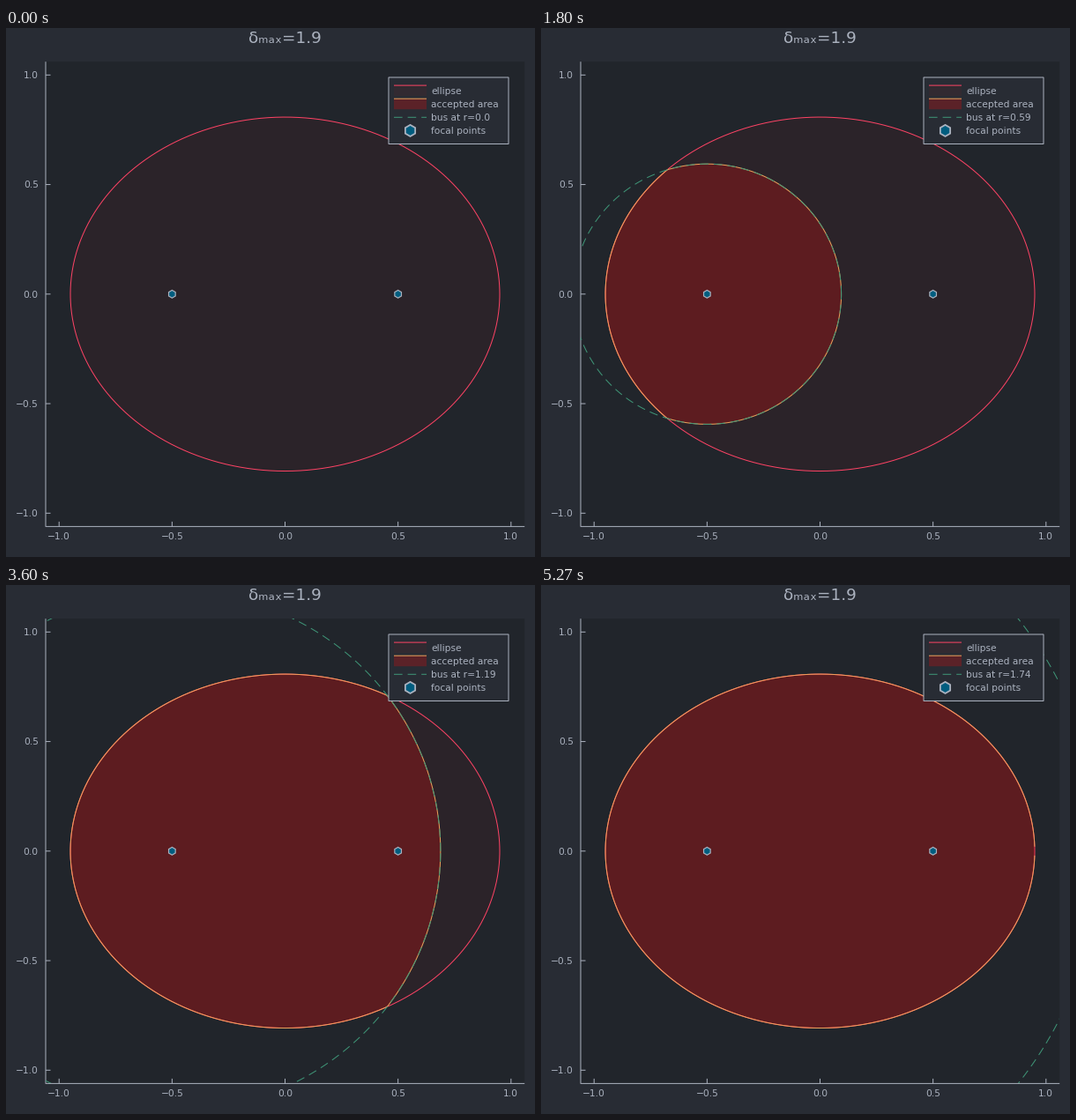
Recreate the animation shown at these times as a matplotlib script. Size 600 px wide and 600 px high, loop 5340 ms.

```python
import numpy as np
import matplotlib.pyplot as plt
from matplotlib.animation import FuncAnimation
from matplotlib.patches import Polygon, Rectangle, RegularPolygon

SIZE, DPI = 600, 100
LOOP_MS, TICK_MS = 5340, 20
STEPS, DR = 80, 0.022

BACK, INSIDE, FORE = "#282C34", "#21252B", "#ABB2BF"
PINK, ORANGE, GREEN, BLUE = "#FE4365", "#ECA25C", "#3F9778", "#005D7F"
TINT = "#F40808"

LEFT, RIGHT, TOP, BOTTOM = 45, 588.2, 38.2, 565.4
CX, CY, SX, SY = 316.5, 301.8, 256.3, 248.5

DELTA = 1.9
A, C = DELTA / 2, 0.5
B = np.sqrt(A**2 - C**2)

plt.rcParams["font.family"] = "DejaVu Sans"
plt.rcParams["path.snap"] = False
plt.rcParams["lines.solid_capstyle"] = "butt"


def pt(px):
    return px * 72 / DPI


def to_px(x, y):
    return np.column_stack([CX + SX * x, CY - SY * y])


fig = plt.figure(figsize=(SIZE / DPI, SIZE / DPI), dpi=DPI, facecolor=BACK)
ax = fig.add_axes([0, 0, 1, 1])
ax.set_xlim(0, SIZE)
ax.set_ylim(SIZE, 0)
ax.axis("off")

LW = pt(1.0)
DASH = (0, (9.6, 6))  # in line widths, so in pixels here


def rect(x0, y0, x1, y1, z, **style):
    return ax.add_patch(Rectangle((x0, y0), x1 - x0, y1 - y0, zorder=z, **style))


def line(xs, ys, color, z, **style):
    return ax.plot(xs, ys, color=color, lw=LW, zorder=z, **style)[0]


def label(x, y, s, size=10.67, ha="left", z=9):
    return ax.text(x, y, s, fontsize=pt(size), color=FORE, ha=ha,
                   va="baseline", zorder=z)


def hexagon(x, y, radius, edge, z):
    ax.add_patch(RegularPolygon((x, y), 6, radius=radius, fc=BLUE, ec=FORE,
                                lw=pt(edge), zorder=z))


def area(points, alpha, z):
    return ax.add_patch(Polygon(points, fc=TINT, alpha=alpha, lw=0, zorder=z))


# Plot area, axes and ticks
panel = rect(LEFT, TOP, RIGHT, BOTTOM, 0, fc=INSIDE, lw=0)
line([LEFT, LEFT, RIGHT], [TOP, BOTTOM, BOTTOM], FORE, 1)
for v in (-1.0, -0.5, 0.0, 0.5, 1.0):
    name = f"{v:.1f}".replace("-", "−")
    x, y = CX + SX * v, CY - SY * v
    line([x, x], [BOTTOM, BOTTOM - 5.5], FORE, 1)
    line([LEFT, LEFT + 5.5], [y, y], FORE, 1)
    label(x, 580.3, name, ha="center")
    label(36.8, y + 3.9, name, ha="right")
label(CX, 17, f"δₘₐₓ={DELTA}", size=18.4, ha="center")

# Ellipse
turn = np.linspace(0, 2 * np.pi, 721)
ellipse = to_px(A * np.cos(turn), B * np.sin(turn))
area(ellipse, 0.05, 2)
line(*ellipse.T, PINK, 3)

# Moving parts
accepted = area(ellipse, 0.25, 4)
border = line([], [], ORANGE, 5)
# The invisible fill stops the path being cut at the stage edge,
# which would restart the dashes there
bus = ax.add_patch(Polygon(ellipse, closed=False, fc=(0, 0, 0, 1e-4), ec=GREEN,
                           lw=LW, ls=DASH, capstyle="butt", zorder=6))
bus.set_clip_path(panel)
for focus in (-C, C):
    hexagon(CX + SX * focus, CY, 4.4, 1.2, 7)

# Legend
rect(434, 56, 570, 131.5, 8, fc=BACK, ec=FORE, lw=LW)
rows = [56 + 15.1 * k for k in range(1, 5)]
for row, color, alpha in ((rows[0], PINK, 0.05), (rows[1], ORANGE, 0.25)):
    rect(440, row - 6, 477, row + 6, 9, fc=TINT, alpha=alpha, lw=0)
    line([440, 477], [row - 6, row - 6], color, 10)
line([440, 477], [rows[2]] * 2, GREEN, 10, linestyle=DASH, dash_capstyle="butt")
hexagon(458.5, rows[3], 6.5, 1.8, 10)
texts = [label(482, row + 4, s) for row, s in
         zip(rows, ("ellipse", "accepted area", "", "focal points"))]


def step_at(ms):
    """Steps last 70, 60 and 70 ms in turn."""
    cycle, rest = divmod(ms, 200)
    return min(3 * cycle + (rest >= 70) + (rest >= 130), STEPS - 1)


def update(tick):
    r = DR * step_at(tick * TICK_MS + TICK_MS // 2)
    # Polar form about the left focus; the full outline stays slightly open
    gap = 0.014 if r > A + C + 0.01 else 0
    theta = np.linspace(gap, 2 * np.pi - gap, 721)
    reach = np.minimum(r, B**2 / (A - C * np.cos(theta)))
    outline = to_px(reach * np.cos(theta) - C, reach * np.sin(theta))
    accepted.set_xy(outline)
    border.set_data(*outline.T)
    bus.set_xy(to_px(r * np.cos(turn) - C, r * np.sin(turn)))
    texts[2].set_text(f"bus at r={round(r, 2)}")
    return accepted, border, bus, texts[2]


anim = FuncAnimation(fig, update, frames=LOOP_MS // TICK_MS, interval=TICK_MS,
                     init_func=lambda: update(0), repeat=True, repeat_delay=0)
plt.show()
```
